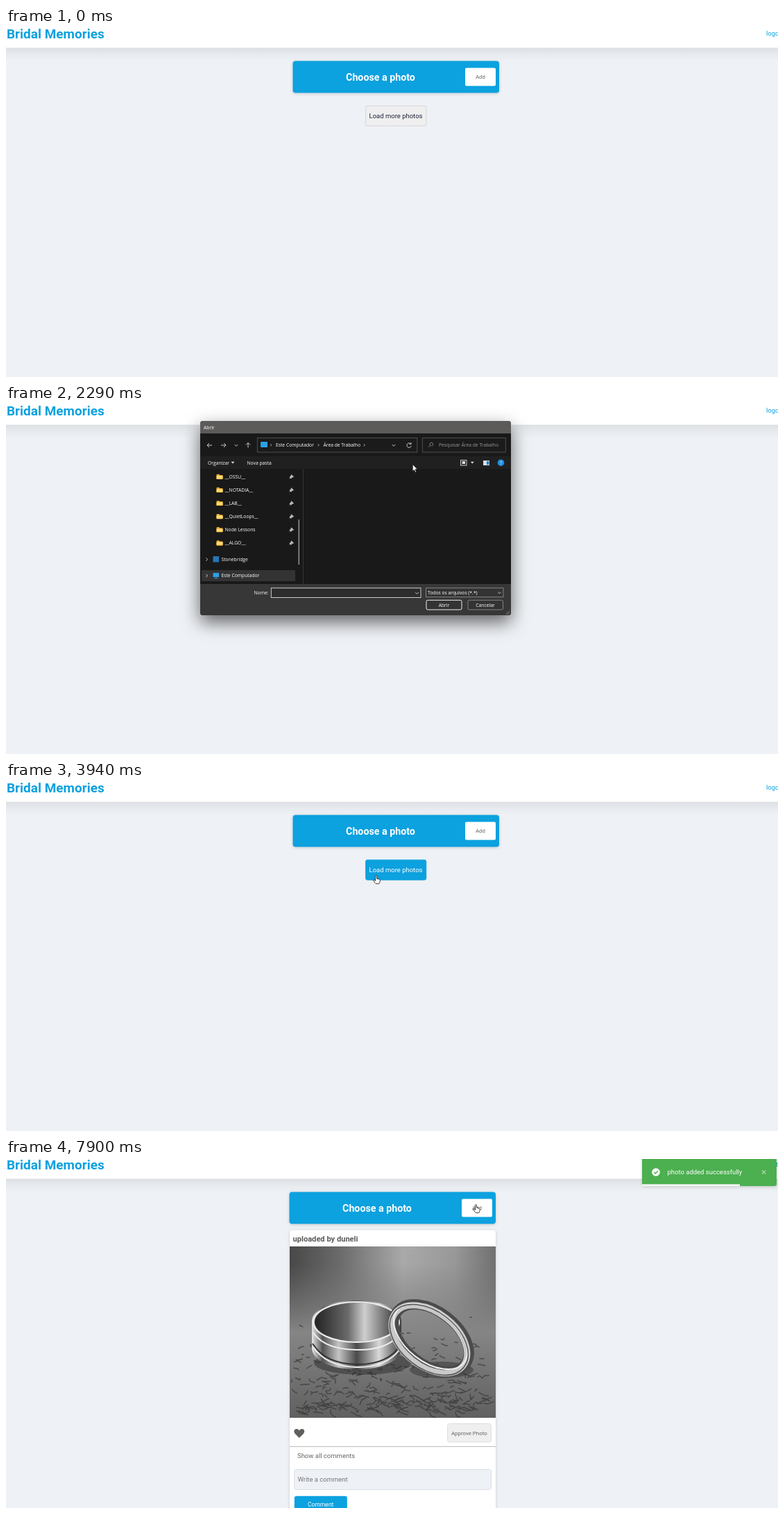
Write an HTML page that moves like this. It is 1113 px wide and 503 px high and loops after 7.99 s.

```html
<!DOCTYPE html>
<html lang="en">
<head>
<meta charset="utf-8">
<title>Photo upload</title>
<style>
  html, body { margin: 0; width: 100%; height: 100%; overflow: hidden; background: #eef1f5; }
  svg { display: block; width: 1113px; height: 503px; font-family: Roboto, sans-serif; font-size: 9.49px; }
  .blue { fill: #0ca1df; }
  .grey { fill: #666; }
  .soft { filter: drop-shadow(0 1px 2px rgba(0, 0, 0, .16)); }
  .bold { font-weight: 700; }
  .small { font-size: 7.9px; }
  .mid { text-anchor: middle; }
  .line { fill: none; stroke: #ddd; stroke-width: .9; }
  .frame { fill: #1b1b1b; stroke: #5c5c5c; stroke-width: .8; }
  #dialog { transform-origin: 464px 153px; }
  #dialog text { font-family: "Open Sans", "Noto Sans", sans-serif; font-size: 6.75px; fill: #fff; }
  #shade { filter: drop-shadow(0 10px 13px rgba(0, 0, 0, .6)); }
</style>
</head>
<body>
<svg viewBox="0 0 1113 503">
  <defs>
    <linearGradient id="fade" x2="0" y2="1">
      <stop stop-opacity=".075"/><stop offset=".5" stop-opacity=".03"/><stop offset="1" stop-opacity="0"/>
    </linearGradient>
    <linearGradient id="back">
      <stop stop-color="#484848"/><stop offset=".25" stop-color="#6c6c6c"/>
      <stop offset=".55" stop-color="#a9a9a9"/><stop offset=".8" stop-color="#989898"/>
      <stop offset="1" stop-color="#707070"/>
    </linearGradient>
    <linearGradient id="ground" x2="0" y2="1">
      <stop offset=".1" stop-color="#777" stop-opacity="0"/><stop offset=".5" stop-color="#858585"/>
      <stop offset="1" stop-color="#606060"/>
    </linearGradient>
    <linearGradient id="steel">
      <stop stop-color="#e8e8e8"/><stop offset=".12" stop-color="#555"/><stop offset=".3" stop-color="#c4c4c4"/>
      <stop offset=".5" stop-color="#4a4a4a"/><stop offset=".75" stop-color="#d8d8d8"/><stop offset="1" stop-color="#3c3c3c"/>
    </linearGradient>
    <linearGradient id="inner">
      <stop stop-color="#222"/><stop offset=".4" stop-color="#6a6a6a"/>
      <stop offset=".6" stop-color="#cfcfcf"/><stop offset="1" stop-color="#333"/>
    </linearGradient>
    <linearGradient id="gold" x2="0" y2="1">
      <stop stop-color="#ffe69c"/><stop offset="1" stop-color="#fcca45"/>
    </linearGradient>
    <clipPath id="reveal"><rect id="shown" x="409" y="126" width="297" height="247"/></clipPath>
    <clipPath id="window"><rect x="280" y="23" width="448" height="280" rx="4"/></clipPath>

    <g id="photo">
      <rect x="409" y="126" width="297" height="247" fill="url(#back)"/>
      <rect x="409" y="126" width="297" height="247" fill="url(#ground)"/>
      <path id="cracks" fill="none" stroke="#333" stroke-width="1.5" opacity=".65"/>
      <ellipse cx="514" cy="294" rx="70" ry="17" fill="#222" opacity=".45"/>
      <ellipse cx="628" cy="304" rx="46" ry="12" fill="#222" opacity=".4"/>
      <path d="M441 234C441 194 570 194 570 234V274C566 313 446 313 441 274Z" fill="url(#steel)"/>
      <ellipse cx="505" cy="235" rx="60" ry="28" fill="url(#inner)"/>
      <g fill="none" stroke="#eee" stroke-width="2">
        <ellipse cx="505" cy="235" rx="62" ry="29"/>
        <path d="M443 250Q458 274 505 275T569 250"/>
        <path d="M442 266Q460 295 505 296T569 268" stroke="#333"/>
        <path d="M443 271Q462 299 505 300T568 274"/>
      </g>
      <g transform="rotate(38 613 258)" fill="none">
        <ellipse cx="613" cy="258" rx="62" ry="38" stroke="#4b4b4b" stroke-width="15"/>
        <ellipse cx="612" cy="261" rx="62" ry="39" stroke="#c9c9c9" stroke-width="9"/>
        <ellipse cx="611" cy="257" rx="61" ry="36" stroke="#eee" stroke-width="2"/>
        <ellipse cx="612" cy="262" rx="64" ry="41" stroke="#555" stroke-width="1.5"/>
      </g>
    </g>
    <g id="folder">
      <path d="M0 1q0-1 1-1h2.6l1.2 1.2H8q1 0 1 1V7H0z" fill="#f0ad1d"/>
      <path d="M0 2.6h9V6.4q0 .8-.8.8H.8Q0 7.200 0 6.400z" fill="url(#gold)"/>
    </g>
    <path id="down" class="line" d="M-2.300-1L0 1.300 2.300-1"/>
    <path id="next" class="line" d="M-1-2.200L1 0-1 2.200"/>
  </defs>

  <rect width="1113" height="503" fill="#eef1f5"/>
  <rect y="28" width="1113" height="20" fill="url(#fade)"/>
  <rect width="1113" height="28.500" fill="#fff"/>
  <text class="blue bold" x="1" y="14.500" font-size="18.980">Bridal Memories</text>
  <text id="logout" class="blue" x="1096" y="11.200">logout</text>

  <g id="bar">
    <rect class="blue soft" x="413.500" y="47.500" width="297.500" height="46" rx="4"/>
    <text class="bold mid" x="540" y="76" font-size="14.240" fill="#fff">Choose a photo</text>
    <rect x="662" y="57.500" width="44" height="26" rx="2" fill="#fff"/>
    <text class="small grey mid" x="684" y="73.300">Add</text>
  </g>

  <g id="spinner" fill="none" stroke-width="9.500">
    <circle cx="562" cy="177" r="30.800" stroke="#f3f3f3"/>
    <path id="arc" d="M540.220 155.220A30.800 30.800 0 0 1 583.780 155.220" stroke="#3498db"/>
  </g>

  <g id="card">
    <rect id="paper" class="soft" x="409" y="102.500" width="297" height="430" rx="4" fill="#fff"/>
    <text class="bold" x="413.500" y="118.500" font-size="11.100" fill="#5c5c5c">uploaded by duneli</text>
    <g id="image" clip-path="url(#reveal)"><use href="#photo"/></g>
    <g id="below" class="grey">
      <path d="M422.800 402l-5.800-5.800c-5-6 2.800-10 5.800-4.800c3-5.200 10.800-1.200 5.800 4.800z" fill="#5f5f5f"/>
      <rect x="636.500" y="381.500" width="63" height="26.500" rx="3" fill="#efefef" stroke="#d9d9d9" stroke-width=".8"/>
      <text class="small mid" x="667.800" y="397.800">Approve Photo</text>
      <path d="M409 414.500H706" stroke="#bdbdbd" stroke-width="1.200"/>
      <text x="420" y="431">Show all comments</text>
      <rect x="415.500" y="447.500" width="284" height="29" rx="3" fill="#eef1f5" stroke="#d5d8dc" stroke-width=".8"/>
      <text x="420.500" y="465" fill="#777">Write a comment</text>
      <rect class="blue" x="415.800" y="485.700" width="76" height="26" rx="3"/>
      <text class="mid" x="453.700" y="501.300" font-size="8.540" fill="#fff">Comment</text>
    </g>
  </g>

  <g id="load">
    <rect id="loadBox" x="518.500" y="112.200" width="87.300" height="29" rx="2.500" stroke-width=".8"/>
    <text id="loadText" class="mid" x="562" y="129.700">Load more photos</text>
  </g>

  <g id="dialog">
    <rect id="shade" x="280" y="23" width="448" height="280" rx="4" fill="#191919"/>
    <g clip-path="url(#window)">
      <rect x="280" y="23" width="448" height="18.300" fill="#5d5b5a"/>
      <g id="blank">
        <rect x="280" y="41" width="448" height="217" fill="#fff"/>
        <rect x="416.600" y="92" width="11" height="166" fill="#1c1c1c"/>
        <path d="M422 165V230" stroke="#aaa" stroke-width="1.200"/>
        <rect x="280" y="257.500" width="448" height="46" fill="#363636"/>
        <path d="M357 265h22v9h-22zM382 263h217v14H382zM606 263h112v14H606zM606 280h52v15h-52zM665 280h52v15h-52zM715 291h13v12h-13z" fill="#fff"/>
        <path class="line" d="M288 28v3m-1.500-1.500h3M292 29l-2 5 4-2zM715.500 29l5 5m0-5l-5 5"/>
        <text x="297.500" y="34.500">Abrir</text>
      </g>
      <g id="full"></g>
      <path id="corner" d="M717 291h11v2.200h-11zM715 296h2v7h-2z" fill="#fff"/>
    </g>
  </g>

  <g id="toast">
    <rect class="soft" x="917" y="-8" width="194" height="47" rx="3" fill="#4caf50"/>
    <circle cx="937" cy="19" r="5.800" fill="#fff"/>
    <path d="M934.200 19l2 2 3.700-3.800" fill="none" stroke="#4caf50" stroke-width="1.500"/>
    <text x="953.500" y="22.300" fill="#fff">photo added successfully</text>
    <path d="M1089.800 16.300l5.400 5.400m0-5.400l-5.400 5.400" stroke="#a5d8a7" stroke-width="1.300"/>
    <rect id="progress" x="917" y="36.300" height="2.900" fill="#f1f5f3"/>
  </g>

  <g id="cursor">
    <circle id="click" r="9.300" fill="#dccb18" opacity=".9"/>
    <path id="arrow" d="M0 0v10.200l2.300-2.200 1.600 3.700 1.600-.700-1.600-3.600h3.200z" fill="#fff" stroke="#111" stroke-width=".8"/>
    <path id="hand" d="M-1 .6Q0-.6 1 .6v4l4 1.200q1.100.4.9 1.600l-.8 3.400q-.2 1.300-1.200 1.300H.3q-.8 0-1.400-.9l-3-3.800q.4-1.500 2-.4l1.100 1z" fill="#fff" stroke="#111" stroke-width=".8"/>
    <circle id="busy" cx="11" cy="6" r="3" fill="none" stroke="#2f8fd8" stroke-width="1.500"/>
  </g>
</svg>
<script>
const $ = id => document.getElementById(id);
const LOOP = 7990;

const text = (x, y, s, extra = '') => `<text x="${x}" y="${y}" ${extra}>${s}</text>`;
const rect = (x, y, w, h, extra) => `<rect x="${x}" y="${y}" width="${w}" height="${h}" ${extra}/>`;
const icon = (name, x, y, scale = 1) => `<use href="#${name}" transform="translate(${x} ${y}) scale(${scale})"/>`;
const path = (d, extra = 'class="line"') => `<path d="${d}" ${extra}/>`;
const triangle = (x, y) => path(`M${x - 2.5} ${y - 1.2}h5l-2.500 2.800z`, 'fill="#ddd"');

// File dialog
const folders = ['__OSSU__', '__NOTADIA__', '__LAB__', '__QuietLoops__', 'Node Lessons', '__ALGO__'];
const sidebar = folders.map((name, i) => {
  const y = 103.3 + 19.1 * i;
  return icon('folder', 303.5, y - 3.6) + text(315.5, y + 2.4, name) +
    path(`M411.500 ${y - 3}l3.300 3.300-2 .5-2 2-2-2 2-2zm-1 4l-2 2`, 'fill="#bbb" stroke="#bbb" stroke-width=".6"');
}).join('');

$('full').innerHTML =
  text(285, 34.8, 'Abrir') +
  rect(280, 41, 448, 33, 'fill="#191919"') + rect(280, 74, 448, 18.5, 'fill="#202020"') +
  rect(280, 92, 448, 166, 'fill="#191919"') +
  path('M297 58h-7m3-3l-3 3 3 3M310 58h7m-3-3l3 3-3 3M349 61.500v-7m-3 3l3-3 3 3') +
  icon('down', 332, 58) + rect(362.3, 47.5, 230.5, 20.5, 'class="frame"') +
  rect(367, 53, 10, 8, 'rx="1" fill="#2ba0e8"') +
  [382, 450.5, 516.5].map(x => icon('next', x, 57.8, .8)).join('') +
  text(389, 60, 'Este Computador') + text(457.5, 60, 'Área de Trabalho') + icon('down', 559, 58) +
  path('M583.500 56a3.200 3.200 0 1 0 .700 3M584 54v2.400h-2.400') +
  rect(600.3, 47.5, 120, 20.5, 'class="frame"') +
  path('M609.500 60.500l2.200-2.500a2.300 2.300 0 1 1 1 .7', 'class="line" opacity=".6"') +
  text(624, 60, 'Pesquisar Área de Trabalho', 'opacity=".55"') +
  text(291, 85.5, 'Organizar') + triangle(327, 83) + text(347.5, 85.5, 'Nova pasta') +
  rect(655.5, 79.5, 8.5, 7.5, 'class="line"') + rect(657.5, 81, 4.5, 4, 'fill="#ddd"') + triangle(672.3, 83) +
  rect(688, 80, 9, 7, 'fill="#ddd"') + rect(693, 81, 3.5, 5, 'fill="#2684c6"') +
  '<circle cx="713.500" cy="83.200" r="4.800" fill="#1f8fe0"/>' + text(713.5, 85.7, '?', 'class="mid"') +
  path('M428.500 92V258', 'stroke="#333"') + path('M422.300 165V230', 'stroke="#9d9d9d" stroke-width="1.400"') +
  sidebar + rect(282, 238, 135, 16, 'fill="#333"') +
  icon('next', 289.5, 222.5) + icon('next', 289.5, 246) +
  rect(298.5, 218, 8.5, 8.5, 'fill="#2577b8"') + text(310.5, 224.8, 'Stonebridge') +
  rect(298.5, 242, 8.5, 6, 'rx=".8" fill="#2ba0e8"') + path('M300.500 249.500h4.500', 'stroke="#2ba0e8"') +
  text(310.5, 248.3, 'Este Computador') +
  '<g id="files">' + icon('folder', 444, 105, 5.55) + text(469.5, 161.5, 'all', 'class="mid"') +
  rect(510.3, 96.8, 61.7, 68, 'id="tile"') +
  '<use href="#photo" transform="translate(513.700 108) scale(.18) translate(-409 -126)"/>' +
  text(541.3, 161.5, 'rings.png', 'class="mid"') + '</g>' +
  rect(280, 258, 448, 45, 'fill="#373737"') + text(357.5, 273, 'Nome:') +
  rect(382.3, 263.8, 215.700, 13.700, 'fill="#2d2d2d" stroke="#ddd" stroke-width=".9"') +
  text(384.5, 273.3, 'rings.png', 'id="name"') + icon('down', 592.5, 271) +
  rect(605.5, 263.8, 111.500, 13, 'fill="#333" stroke="#999" stroke-width=".8"') +
  text(608, 272.8, 'Todos os arquivos (*.*)') + icon('down', 711.5, 270.5) +
  rect(606, 281.300, 51, 13.700, 'rx="2" fill="#333" stroke="#eee"') + text(631.5, 290.600, 'Abrir', 'class="mid"') +
  rect(666, 281.300, 50.500, 13.700, 'rx="2" fill="#333" stroke="#999" stroke-width=".8"') +
  text(691, 290.600, 'Cancelar', 'class="mid"') +
  path('M721 301.500l4.500-4.500m-2 4.500l2-2', 'class="line" stroke-dasharray="1 .8"');

// Leather cracks, denser towards the viewer
let seed = 7;
const rnd = () => (seed = seed * 16807 % 2147483647) / 2147483647;
let cracks = '';
for (let i = 0; i < 300; i++) {
  const depth = Math.sqrt(rnd()), size = 3 + 9 * depth;
  cracks += `M${(411 + rnd() * 280).toFixed(1)} ${(228 + depth * 138).toFixed(1)}`;
  for (let k = 0; k < 2; k++) cracks += `l${(rnd() * size).toFixed(1)} ${((rnd() - .5) * size).toFixed(1)}`;
}
$('cracks').setAttribute('d', cracks);

// The screen refreshes only in these runs: start, end, steps
const runs = [[0, 0, 1], [190, 960, 11], [1040, 1120, 2], [1500, 1600, 2], [1750, 1830, 2],
  [2130, 2770, 9], [2930, 2930, 1], [3150, 3380, 4], [3940, 4700, 11], [4770, 4850, 2],
  [5000, 5790, 11], [5860, 6560, 10], [6730, 7520, 11], [7590, 7900, 5]];
const ticks = runs.flatMap(([a, b, n]) =>
  Array.from({ length: n }, (_, i) => Math.round(a + (b - a) * i / Math.max(1, n - 1))));
const snap = t => ticks.reduce((last, tick) => tick <= t ? tick : last, 0);

// Pointer route: time, x, y
const route = [[190, 1019, 494], [350, 900, 415], [500, 760, 310], [650, 650, 220], [730, 614, 186],
  [810, 600, 160], [880, 609, 128], [960, 614, 107], [1040, 602, 88], [1120, 605.5, 76.5],
  [2130, 605.5, 76.5], [2300, 585, 86], [2600, 532, 118], [2770, 525, 121.5], [3380, 525, 121.5],
  [3940, 533.5, 134.5], [4092, 551, 180], [4168, 562, 194], [4244, 577, 197], [4320, 596, 190],
  [4472, 638, 145], [4624, 668, 86], [4700, 675, 70], [4770, 677.5, 65.5]];
const pointer = t => {
  const i = route.findIndex(p => p[0] > t);
  if (i < 1) return route.at(-1).slice(1);
  const [t0, x0, y0] = route[i - 1], [t1, x1, y1] = route[i];
  const u = t1 === 3940 ? 0 : (t - t0) / (t1 - t0);
  return [x0 + (x1 - x0) * u, y0 + (y1 - y0) * u];
};

const bounce = [[0, 1779], [.6, -15], [.75, 6], [.9, -3], [1, 0]];
const slide = u => {
  const i = bounce.findIndex(k => k[0] > u);
  if (i < 1) return 0;
  const [a, from] = bounce[i - 1], [b, to] = bounce[i];
  return to + (from - to) * (1 - (u - a) / (b - a)) ** 3;
};

const show = (id, on) => { $(id).style.display = on ? '' : 'none'; };
const set = (id, name, value) => $(id).setAttribute(name, value);
const move = (id, x, y) => set(id, 'transform', `translate(${x} ${y})`);
const within = (t, a, b) => t >= a && t < b;

function dialogPose(t) {
  if (t < 2200) return [.908, .46];
  if (t < 2280) return [.975, .85];
  if (t < 3200) return [1, 1];
  return t < 3280 ? [.96, .5] : [.92, .15];
}

function draw(t) {
  const dialog = within(t, 2130, 3380);
  const loading = within(t, 5000, 6560), card = t >= 6560, loaded = t >= 6730;

  const [x, y] = pointer(t);
  const onLoad = !dialog && t < 5000 && x > 518 && x < 606 && y > 112 && y < 141;
  const onAdd = x > 662 && x < 706 && y > 57 && y < 84;
  show('cursor', t >= 190);
  move('cursor', x, y);
  show('hand', onLoad || onAdd);
  show('arrow', !(onLoad || onAdd));
  show('busy', within(t, 1750, 1830));
  show('click', within(t, 1500, 1600) || within(t, 2930, 3200) || within(t, 4850, 5000));

  show('load', !loaded);
  move('load', 0, card ? 199 : loading ? 147.3 : 0);
  set('loadBox', 'fill', onLoad ? '#0ca1df' : '#efefef');
  set('loadBox', 'stroke', onLoad ? '#0ca1df' : '#d0d0d0');
  set('loadText', 'fill', onLoad ? '#fff' : '#20243a');

  show('dialog', dialog);
  if (dialog) {
    const [scale, opacity] = dialogPose(t);
    $('dialog').style.transform = `scale(${scale})`;
    $('dialog').style.opacity = opacity;
    show('blank', t < 2280);
    show('full', t >= 2280);
    show('files', t >= 2440);
    show('name', t >= 2930);
    show('corner', t >= 3150);
    set('tile', 'fill', t >= 2930 ? '#777' : t >= 2600 ? '#4d4d4d' : '#191919');
  }

  show('spinner', loading);
  set('arc', 'transform', `rotate(${(t - 4951) * .18} 562 177)`);

  move('bar', loaded ? -5 : 0, 0);
  set('logout', 'x', loaded ? 1086.300 : 1096);
  show('card', card);
  move('card', loaded ? 0 : 5, 0);
  show('image', loaded);
  move('below', 0, loaded ? 0 : -247);
  set('paper', 'height', loaded ? 430 : 180);
  set('shown', 'height', t < 6800 ? 82 : t < 6880 ? 165 : 247);

  show('toast', loaded);
  move('toast', slide((t - 6540) / 750), 0);
  set('progress', 'width', 194 * Math.max(0, Math.min(1, 1 - (t - 6534) / 5000)));
}

const start = performance.now();
function frame() {
  draw(snap((performance.now() - start) % LOOP));
  requestAnimationFrame(frame);
}
frame();
</script>
</body>
</html>
```
